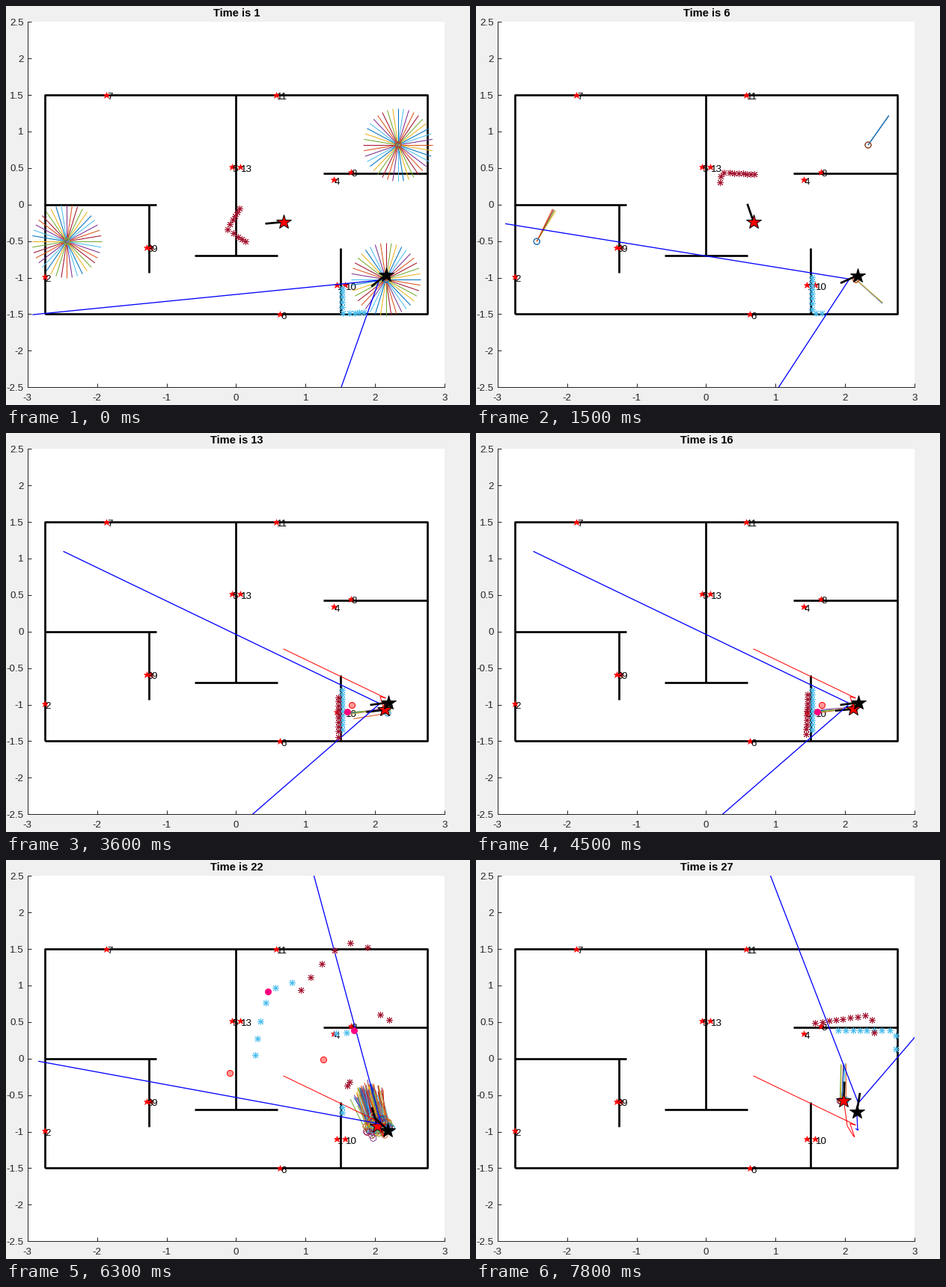
Animation of 620 by 534 pixels, one loop 8000 ms. Source, as a matplotlib script:

```python
import numpy as np
import matplotlib.pyplot as plt
from matplotlib.animation import FuncAnimation
from matplotlib.collections import LineCollection

plt.rcParams["font.family"] = "Liberation Sans"
WIDTH, HEIGHT, PX = 620, 534, 0.72  # PX: points per pixel at 100 dpi
INTERVAL, STEP_MS, LOOP_MS = 100, 300, 8000
RAY, STUB, CAMERA = 0.5, 0.25, 0.124
FOV, REACH = 32.1, 5.0
BEAMS = np.linspace(-26, 26, 10)
LOCK, LOST = 7, 22  # steps where the estimate snaps in and where it is least certain
PALETTE = np.array(["#0072bd", "#d95319", "#edb120", "#7e2f8e", "#77ac30", "#4dbeee", "#a2142f"])
INK = "#262626"

WALLS = [
    [(-2.75, -1.5), (2.75, -1.5), (2.75, 1.5), (-2.75, 1.5), (-2.75, -1.5)],
    [(0, 1.5), (0, -0.7)],
    [(-0.6, -0.7), (0.6, -0.7)],
    [(-2.75, 0), (-1.15, 0)],
    [(-1.25, 0), (-1.25, -0.93)],
    [(1.25, 0.43), (2.75, 0.43)],
    [(1.5, -0.6), (1.5, -1.5)],
]
SEGMENTS = np.array([pair for wall in WALLS for pair in zip(wall, wall[1:])], float)
LANDMARKS = {
    1: (1.445, -1.1), 2: (-2.75, -0.985), 3: (-1.29, -0.585), 4: (1.4, 0.34),
    5: (-0.06, 0.515), 6: (0.63, -1.5), 7: (-1.865, 1.505), 8: (1.65, 0.45),
    9: (-1.23, -0.585), 10: (1.565, -1.1), 11: (0.575, 1.505), 13: (0.06, 0.515),
}
# center, ray direction and fan width once the rays have converged
CLUSTERS = [((2.33, 0.815), 53.5, 0), ((-2.435, -0.505), 61, 8), ((2.155, -1.025), -40, 1.5)]

# step: x, y, heading in degrees
TRUE_POSE = {1: (2.155, -0.96, 217.5), 4: (2.165, -0.97, 214), 9: (2.19, -0.97, 187.5),
             16: (2.19, -0.97, 187.5), LOST: (2.18, -0.98, 138), 27: (2.167, -0.73, 80)}
GUESS_POSE = {LOCK: (2.15, -0.91, 205), 9: (2.07, -0.89, 201), 13: (2.135, -1.07, 187),
              16: (2.12, -1.06, 185), LOST: (2.03, -0.92, 107), 27: (1.98, -0.58, 88)}
# first step: measured marks, matched marks
MATCHES = {
    1: ([], []),
    LOCK: ([(1.66, -1.0)], [(1.6, -1.1)]),
    20: ([(-0.095, -0.195), (1.25, -0.015)], [(0.455, 0.915), (1.7, 0.39)]),
    24: ([], []),
}


def heading(degrees):
    radians = np.radians(degrees)
    return np.stack([np.cos(radians), np.sin(radians)], axis=-1)


def cross(a, b):
    return a[..., 0] * b[..., 1] - a[..., 1] * b[..., 0]


def tween(keys, step):
    return np.array([np.interp(step, list(keys), axis) for axis in zip(*keys.values())])


def true_pose(step):
    return tween(TRUE_POSE, step)


def guess_pose(step):
    if step >= LOCK:
        return tween(GUESS_POSE, step)
    x, y = np.mean([center for center, *_ in CLUSTERS], axis=0)
    return np.array([x, y, 200 - 15 * step])


def camera(pose):
    return pose[:2] + CAMERA * heading(pose[2])


def wall_ranges(pose):
    """Distance from the camera to the nearest wall along each beam."""
    start = SEGMENTS[:, 0] - camera(pose)
    edge = SEGMENTS[:, 1] - SEGMENTS[:, 0]
    beam = heading(pose[2] + BEAMS)[:, None]
    with np.errstate(divide="ignore", invalid="ignore"):
        distance = cross(start, edge) / cross(beam, edge)
        along = cross(start, beam) / cross(beam, edge)
    hit = (distance > 0) & (along >= 0) & (along <= 1)
    nearest = np.where(hit, distance, REACH).min(axis=1)
    return nearest * (1 - 0.0225 * nearest ** 2) - 0.02  # the sensor reads far walls short


def scan(pose, distances):
    return camera(pose) + distances[:, None] * heading(pose[2] + BEAMS)


def particles(step, guess):
    """Positions and headings of all particles."""
    if step < LOCK:
        count = max(4, 40 >> 2 * (step - 1))
        turn = np.arange(count) / count
        spots = np.repeat([center for center, *_ in CLUSTERS], count, axis=0)
        fans = [360 * turn if step == 1 else angle + width * (turn - 0.5)
                for _, angle, width in CLUSTERS]
        return spots, np.concatenate(fans)
    doubt = np.exp(-((step - LOST) / 2) ** 2)
    rng = np.random.default_rng(step)
    spread = np.array([0.025 + 0.05 * doubt, 0.015 + 0.04 * doubt, 2 + 4.5 * doubt])
    poses = guess + rng.normal(0, spread, (int(6 + 165 * doubt), 3))
    return poses[:, :2], poses[:, 2]


fig = plt.figure(figsize=(WIDTH / 100, HEIGHT / 100), dpi=100, facecolor="#f0f0f0")
ax = fig.add_axes([28.7 / WIDTH, 1 - 510.25 / HEIGHT, 557.5 / WIDTH, 489 / HEIGHT])
ax.set(xlim=(-3, 3), ylim=(-2.5, 2.5), facecolor="white")
ax.spines[["top", "right"]].set_visible(False)
ax.spines[["left", "bottom"]].set(color=INK, linewidth=PX)
x_ticks, y_ticks = np.arange(-3, 4), np.arange(-2.5, 2.6, 0.5)
ax.set_xticks(x_ticks, [f"{v:g}" for v in x_ticks])
ax.set_yticks(y_ticks, [f"{v:g}" for v in y_ticks])
ax.tick_params(direction="in", length=5 * PX, width=PX, color=INK, labelcolor=INK,
               labelsize=13.33 * PX)
ax.tick_params(axis="x", pad=9 * PX)
ax.tick_params(axis="y", pad=5 * PX)
title = fig.text(308 / WIDTH, 1 - 10 / HEIGHT, "", ha="center", va="center",
                 weight="bold", size=14.67 * PX)

for wall in WALLS:
    ax.plot(*zip(*wall), color="black", lw=2.7 * PX, zorder=2, solid_capstyle="butt")
for label, (x, y) in LANDMARKS.items():
    ax.plot(x, y, "*", color="red", ms=9 * PX, mew=0.5 * PX, zorder=3)
    ax.text(x + 0.01, y - 0.02, str(label), size=13.33 * PX, va="center_baseline", zorder=3.5)

live = []


def stroke(points, color, width, z):
    live.extend(ax.plot(*np.transpose(points), color=color, lw=width * PX, zorder=z))


def marks(points, marker, size, face, edge, z):
    if len(points):
        live.extend(ax.plot(*np.transpose(points), ls="", marker=marker, ms=size * PX,
                            mfc=face, mec=edge, mew=PX, zorder=z))


def robot(pose, face, z):
    spot = pose[:2]
    stroke([spot, spot + STUB * heading(pose[2])], "black", 2.7, z)
    marks([spot], "*", 21, face, "black", z + 0.1)


def draw(frame):
    while live:
        live.pop().remove()
    step = frame * INTERVAL // STEP_MS + 1
    title.set_text(f"Time is {step}")
    true, guess = true_pose(step), guess_pose(step)

    # each particle takes two palette colours: one for its circle, one for its ray
    spots, angles = particles(step, guess)
    order = 2 * np.arange(len(spots))
    rays = np.stack([spots, spots + RAY * heading(angles)], axis=1)
    live.append(ax.add_collection(LineCollection(
        rays, colors=PALETTE[(order + 1) % 7], linewidths=1.05 * PX, zorder=4)))
    live.append(ax.scatter(*spots.T, s=(8 * PX) ** 2, facecolors="none",
                           edgecolors=PALETTE[order % 7], linewidths=0.9 * PX, zorder=4.1))
    robot(guess, "red", 5)

    eye = camera(true)
    for side in (-FOV, FOV):
        stroke([eye, eye + REACH * heading(true[2] + side)], "blue", 1.3, 6)
    if step >= LOCK:
        stroke([guess_pose(s)[:2] for s in range(LOCK - 1, step + 1)], "red", 1.0, 6)
    stroke([true_pose(s)[:2] for s in range(1, step + 1)], "blue", 1.2, 6)
    robot(true, "black", 7)

    distances = wall_ranges(true)
    marks(scan(true, distances), (8, 2, 0), 9, "none", PALETTE[5], 8)
    marks(scan(guess, distances), (8, 2, 0), 9, "none", PALETTE[6], 8)
    measured, matched = MATCHES[max(s for s in MATCHES if s <= step)]
    marks(measured, "o", 8, "#ff9999", "red", 9)
    marks(matched, "o", 8, "#ff007f", "#ff007f", 9)
    return live


anim = FuncAnimation(fig, draw, frames=LOOP_MS // INTERVAL, interval=INTERVAL,
                     init_func=lambda: [], repeat=True, repeat_delay=0, blit=False)
plt.show()
```
